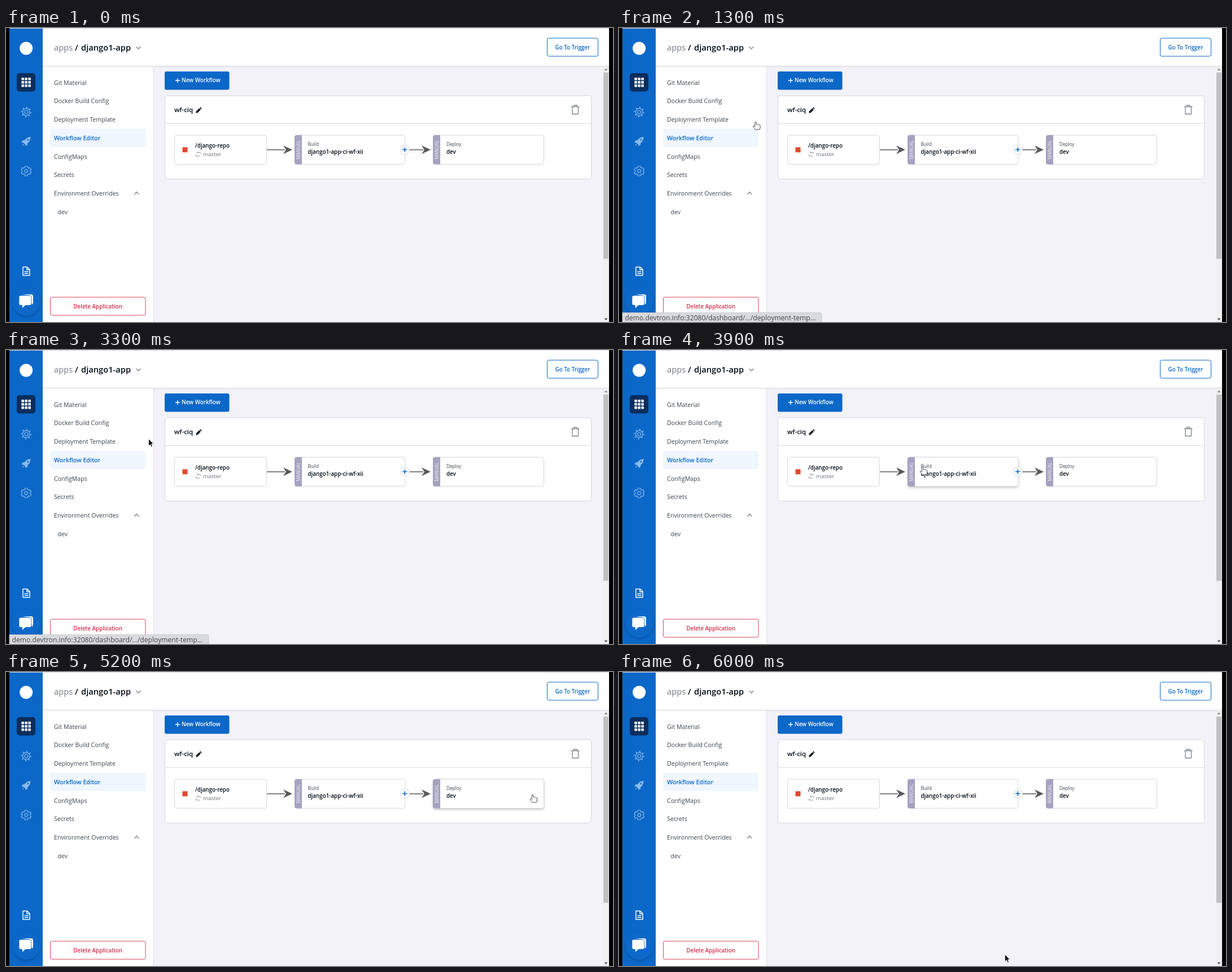
Write an HTML page that moves like this. It is 1075 by 521 pixels and loops after 6.1 s.

```html
<!DOCTYPE html>
<html lang="en">
<head>
<meta charset="utf-8">
<title>Workflow editor</title>
<style>
html, body { margin: 0; width: 100%; height: 100%; overflow: hidden; background: #000; }
svg { display: block; font: 10.62px "Open Sans", "Noto Sans", sans-serif; fill: #3b444c; }
.b { font-weight: 600; }
.dark { fill: #000a14; }
.s { font-size: 9.8px; }
.xs { font-size: 8.16px; }
.blue { fill: #0b67c8; }
.mid { text-anchor: middle; }
.line { fill: none; stroke-linecap: round; stroke-linejoin: round; }
.box { fill: #fff; stroke: #d3d6dc; }
.pale { stroke: #8abbec; }
</style>
</head>
<body>
<svg width="1075" height="521" viewBox="0 0 1075 521">
  <defs>
    <filter id="soft" x="-20%" y="-40%" width="140%" height="200%">
      <feDropShadow dx="0" dy="2" stdDeviation="2" flood-color="#000a14" flood-opacity=".22"/>
    </filter>
    <linearGradient id="fade" x2="0" y2="1">
      <stop stop-color="#d9dbe2"/><stop offset="1" stop-color="#d9dbe2" stop-opacity="0"/>
    </linearGradient>
    <g id="gear" class="line pale" stroke-width="1.2">
      <circle r="2.8"/>
      <path d="M-2-8.5H2L2.8-6 4.3-5.1 6.9-5.8 8.8-2.4 7-.6V.6L8.8 2.4 6.9 5.8 4.3 5.1 2.8 6 2 8.5H-2L-2.8 6-4.3 5.1-6.9 5.8-8.8 2.4-7 .6V-.6L-8.8-2.4-6.9-5.8-4.3-5.1-2.8-6Z"/>
    </g>
    <g id="link">
      <path d="M0 0H32" fill="none" stroke="#646468" stroke-width="1.6"/>
      <path d="M45 0 29-7.5 34 0 29 7.5Z" fill="#58585c"/>
    </g>
    <g id="manual">
      <path d="M13 0V52H4Q0 52 0 48V4Q0 0 4 0Z" fill="#a5a2c0"/>
      <text class="xs mid" transform="translate(9.6 26) rotate(-90)" style="fill:#f1f0f7">MANUAL</text>
    </g>
  </defs>

  <path d="M6 0H1068V521H6Z" fill="#f2f2f8"/>
  <path d="M65 0H1068V67H65ZM65 67H261V521H65Z" fill="#fff"/>
  <path d="M261.5 67V521" stroke="#d9dce2"/>
  <path d="M65 67H1068V70H65Z" fill="url(#fade)"/>
  <path d="M6 0H1068V1.3H6Z" fill="#dedfe1"/>

  <!-- rail -->
  <path d="M6 1H65V521H6Z" fill="#0b67c8"/>
  <circle cx="35.7" cy="36" r="11.5" fill="#fff"/>
  <rect x="19" y="80" width="33" height="32.5" rx="5" fill="#0a2d5c"/>
  <g id="grid" fill="#fff"></g>
  <g class="line pale" transform="translate(35.8 149)" stroke-width="1.2">
    <circle r="6.3"/><circle r="3"/>
    <circle r="8.2" stroke-width="2.4" stroke-dasharray="1.6 4.84" stroke-linecap="butt"/>
  </g>
  <path d="M43.5 193Q37 193 32.5 199L29 199.5 27.8 203 31 203.5 34 206.3 34.5 209 38 207.3 38.3 204Q43.8 199.500 43.5 193ZM30.300 205.500 28.500 208.500 31.800 207Z" fill="#8abbec"/>
  <circle cx="38.8" cy="198" r="1.4" class="blue"/>
  <use href="#gear" x="35.8" y="253.5"/>
  <g class="line" stroke="#fff" stroke-width="1.5">
    <path d="M30 423.500H37.500L42 428V438.500H30ZM37 424V428.500H41.500M33 431.800H39M33 435H39"/>
  </g>
  <circle cx="36" cy="485" r="24.5" fill="#0b67c8" filter="url(#soft)"/>
  <path d="M29 472H44.500Q48 472 48 475.500V486.500Q48 489 46 490L43 474Z" fill="#fff"/>
  <path d="M26 474H42Q45 474 45 477V488.500Q45 491.500 42 491.500H34.500L28.500 497V491.500H26Q23 491.500 23 488.500V477Q23 474 26 474Z" fill="#fff" stroke="#0b67c8" stroke-width=".8"/>

  <!-- header -->
  <text x="85" y="40" style="font-size:14.69px;fill:#747b83">apps</text>
  <text x="122" y="40" class="b dark" style="font-size:14.69px">/</text>
  <text x="133" y="40" class="b dark" style="font-size:14.69px">django1-app</text>
  <path class="line" d="M231 33.500 234.500 37 238 33.500" stroke="#7c838a" stroke-width="1.4"/>
  <rect x="958.500" y="18" width="90" height="32" rx="3" fill="#fff" stroke="#0b67c8"/>
  <text x="1003.500" y="38" class="b s blue mid">Go To Trigger</text>

  <!-- side menu -->
  <rect x="78" y="178.500" width="169" height="32.500" rx="3" fill="#eff6fe"/>
  <g id="menu"></g>
  <path class="line" d="M227.500 294.500 231.200 290.500 235 294.500" stroke="#7c838a" stroke-width="1.3"/>
  <rect x="78.500" y="477" width="168.500" height="32" rx="3" fill="#fff" stroke="#d6455c"/>
  <text x="162.700" y="497" class="b s mid" style="fill:#d32f49">Delete Application</text>

  <!-- workflow -->
  <rect x="281" y="77" width="114.500" height="32.500" rx="3" class="blue"/>
  <path d="M299.800 93H308M303.900 89V97" stroke="#fff" stroke-width="1.4"/>
  <text x="311" y="96.300" class="b s" style="fill:#fff">New Workflow</text>
  <rect x="281.500" y="120" width="755" height="147.500" rx="4" class="box"/>
  <path d="M282 169.500H1036" stroke="#d8dbe0"/>
  <text x="298" y="149" class="b dark" style="font-size:11.43px">wf-ciq</text>
  <path d="M336.500 150.500V148L342.300 142.200 344.800 144.700 339 150.500ZM343 141.500 344.200 140.300 346.700 142.800 345.500 144Z" class="dark"/>
  <path class="line" d="M1001.500 139.500H1015M1005.500 139V137H1011V139M1003 140V152.500H1013.500V140" stroke="#7b8289" stroke-width="1.3"/>

  <rect class="box node" x="298.500" y="190" width="163" height="51.500" rx="4"/>
  <rect class="box node" x="511.500" y="190" width="195.500" height="51.500" rx="4"/>
  <rect class="box node" x="756.500" y="190" width="196" height="51.500" rx="4"/>
  <use href="#link" x="462" y="215.800"/>
  <use href="#link" x="707" y="215.800"/>
  <use href="#manual" x="511" y="189.800"/>
  <use href="#manual" x="756" y="189.800"/>
  <rect x="312.500" y="211.300" width="9" height="9" fill="#e2492f"/>
  <text x="335" y="212" class="b s dark">/django-repo</text>
  <path class="line" d="M338.500 220.500H344V223M338.500 220.500 340 219M338.500 220.500 340 222M336.500 224V227H343.500" stroke="#8a9097" stroke-width=".9"/>
  <text x="349" y="227.300" class="s" style="fill:#666d75">master</text>
  <text x="534.500" y="208.700" class="xs">Build</text>
  <text x="534.500" y="223" class="b s dark">django1-app-ci-wf-xii</text>
  <text x="780" y="208.700" class="xs">Deploy</text>
  <text x="780" y="223" class="b s dark">dev</text>
  <circle cx="706.300" cy="215.500" r="8" class="box"/>
  <path d="M702 215.500H710.600M706.300 211.200V219.800" stroke="#0b67c8" stroke-width="1.5"/>

  <!-- scrollbar -->
  <path d="M1057 68H1068V521H1057Z" fill="#f0f0f2"/>
  <path d="M1058 79H1067V409H1058Z" fill="#c1c1c3"/>
  <path d="M1059.500 75 1062.500 71.500 1065.500 75Z" fill="#8b8b8d"/>
  <path d="M1059.500 514.500H1065.500L1062.500 518Z" fill="#505052"/>

  <g id="status">
    <path fill="#d9dade" stroke="#c3c5ca" stroke-width=".8"/>
    <text x="10.500" y="517.500" style="font-size:12.13px;fill:#404347"></text>
  </g>

  <g id="cursor">
    <path id="arrow" d="M0 0V12.500L2.900 9.900 4.900 14.300 6.900 13.400 5 9.200H8.800Z" fill="#000" stroke="#fff" stroke-width=".8"/>
    <path id="hand" d="M-1.300 1Q0-.8 1.300 1V5Q2.800 4 3.800 5.200 5.200 4.500 6 5.800 7.800 5.300 8.100 7V10Q8 12 6.800 14H-.7Q-2 11.800-4.200 9.300-4.800 7.300-3 7.600L-1.300 9Z" fill="#fff" stroke="#4a4c50"/>
  </g>
</svg>
<script>
const $ = id => document.getElementById(id);
const LOOP = 6100, STEP = 100;

for (let i = 0; i < 9; i++)
  $("grid").innerHTML += `<rect x="${27.4 + i % 3 * 6}" y="${88 + (i / 3 | 0) * 6}" width="4.500" height="4.500" rx=".5"/>`;

["Git Material", "Docker Build Config", "Deployment Template", "Workflow Editor",
 "ConfigMaps", "Secrets", "Environment Overrides", "dev"].forEach((label, i) => {
  const look = i === 3 ? "b blue" : "";
  $("menu").innerHTML += `<text x="${i === 7 ? 91.5 : 85}" y="${100.7 + i * 32.7}" class="${look}">${label}</text>`;
});

// Pointer stops: time, x, y
const stops = [
  [500, 560, 530], [1000, 392.5, 113.5], [1300, 242, 166], [1500, 205, 186],
  [1900, 198.500, 193.500], [2600, 198.500, 193.500], [3000, 226, 167],
  [3300, 252.500, 157.500], [4400, 754.500, 244.500], [5200, 932.500, 217], [6000, 683.500, 500.500]
];
const host = "demo.devtron.info:32080/dashboard/";
const editorUrl = host + "app/72/edit/workflow", templateUrl = host + "…/deployment-temp…";
// Status line: start time, text, right edge
const notes = [[0, ""], [1300, templateUrl, 359], [1600, editorUrl, 353], [3000, templateUrl, 359], [3600, ""]];
const nodes = [...document.querySelectorAll(".node")];
const menuArea = [78, 80, 169, 262], newButton = [281, 77, 114, 32];

const inside = (x, y, [left, top, w, h]) => x >= left && x <= left + w && y >= top && y <= top + h;
const area = el => ["x", "y", "width", "height"].map(k => +el.getAttribute(k));

function pointerAt(t) {
  const i = stops.findIndex(s => s[0] > t);
  if (i < 0) return stops.at(-1).slice(1);
  if (i === 0) return [-50, -50];
  const [t0, x0, y0] = stops[i - 1], [t1, x1, y1] = stops[i];
  const u = (t - t0) / (t1 - t0), k = u * u * (3 - 2 * u);
  return [x0 + (x1 - x0) * k, y0 + (y1 - y0) * k];
}

function draw(t) {
  const [x, y] = pointerAt(t);
  let hand = inside(x, y, menuArea) || inside(x, y, newButton);
  for (const node of nodes) {
    const over = inside(x, y, area(node));
    hand ||= over;
    node.setAttribute("filter", over ? "url(#soft)" : "none");
  }
  $("cursor").setAttribute("transform", `translate(${x} ${y})`);
  $("hand").style.display = hand ? "" : "none";
  $("arrow").style.display = hand ? "none" : "";

  const [, text, edge] = notes.findLast(n => n[0] <= t);
  const [bar, label] = $("status").children;
  $("status").style.display = text ? "" : "none";
  if (text) bar.setAttribute("d", `M6 504.500H${edge - 3}Q${edge} 504.500 ${edge} 507.500V522H6Z`);
  label.textContent = text;
}

const start = performance.now();
function tick() {
  const t = (performance.now() - start) % LOOP;
  draw(Math.floor(t / STEP) * STEP);
  requestAnimationFrame(tick);
}
tick();
</script>
</body>
</html>
```
